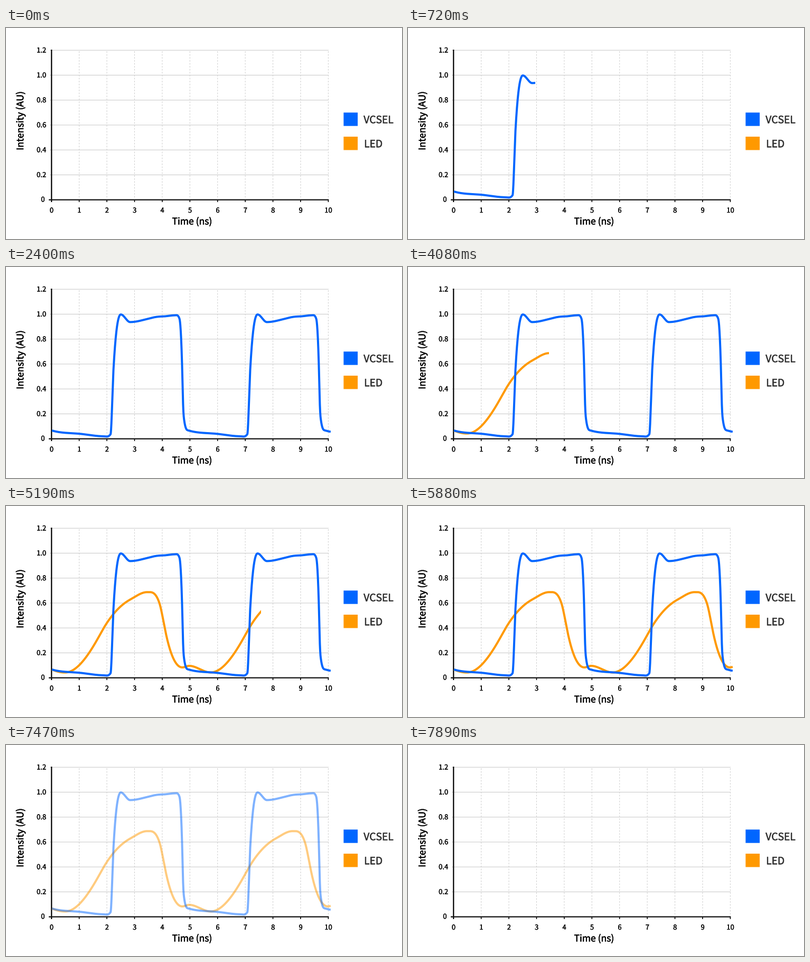
Animation of 750 by 400 pixels, one loop 8100 ms. Source, as a matplotlib script:

```python
import numpy as np
import matplotlib.pyplot as plt
from matplotlib.animation import FuncAnimation
from matplotlib.patches import Rectangle
from matplotlib.patheffects import withStroke

W, H, DPI = 750, 400, 100
FRAMES, STEP = 270, 30
PT = 72 / DPI
BLUE, ORANGE = "#0066ff", "#ff9900"
INK, GRID = "#111111", "#cccccc"
X0, Y0, DX, DY = 86.2, 325.7, 52.42, 47.25

fig = plt.figure(figsize=(W / DPI, H / DPI), dpi=DPI, facecolor="white")
ax = fig.add_axes([0, 0, 1, 1])
ax.set_xlim(0, W)
ax.set_ylim(H, 0)
ax.axis("off")


def line(xs, ys, color, width, **kw):
    return ax.plot(xs, ys, color=color, lw=width * PT, snap=False,
                   solid_capstyle="butt", dash_capstyle="butt", **kw)[0]


def label(x, y, text, size, color="black", weight=0.03, **kw):
    # a thin outline gives the regular face a semibold weight
    ax.text(x, y, text, fontsize=size * PT, color=color,
            family="Noto Sans CJK JP", va="baseline",
            path_effects=[withStroke(linewidth=size * weight * PT,
                                     foreground=color)], **kw)


def hermite(x, keys):
    """Cubic through (x, y, slope) keys."""
    kx, ky, km = np.array(keys, float).T
    i = np.clip(np.searchsorted(kx, x, side="right") - 1, 0, len(kx) - 2)
    h = kx[i + 1] - kx[i]
    s = (x - kx[i]) / h
    ease = s * s * (3 - 2 * s)
    return (ky[i] + ease * (ky[i + 1] - ky[i])
            + h * s * (1 - s) * ((1 - s) * km[i] - s * km[i + 1]))


def periodic(x, keys):
    """Repeat the keyed pulse; x before its first key is left alone."""
    start, end = keys[0][0], keys[-1][0]
    return hermite(start + (x - start) % (end - start), keys)


def build_chart():
    for k in range(1, 7):
        y = Y0 - k * DY
        line([83, 611], [y, y], GRID, 1.1)
        label(76.3, y + 4.3, f"{k * 0.2:.1f}", 13, weight=0.022, ha="right")
    label(73.5, Y0 + 3.7, "0", 13, weight=0.022, ha="right")

    for k in range(11):
        x = X0 + k * DX
        if k:
            line([x, x], [44, 324], GRID, 1, ls=(0, (3, 2.6)))
            line([x, x], [Y0, 330], INK, 1.8)
        label(x + 0.2, 350, str(k), 13, weight=0.022, ha="center")

    line([81, 611.3], [Y0, Y0], INK, 2.2)
    line([X0, X0], [41, 330], INK, 2.4)
    label(352.5, 372.5, "Time (ns)", 17.5, ha="center")
    label(33, 176, "Intensity (AU)", 17.7, ha="center", rotation=90,
          rotation_mode="anchor")

    for y, x, color, text in ((160.3, 677.3, BLUE, "VCSEL"),
                              (206, 678.2, ORANGE, "LED")):
        ax.add_patch(Rectangle((639.4, y), 26.7, 25.4, color=color, lw=0,
                               snap=False))
        label(x, y + 20.2, text, 19.2, "#333333")


build_chart()

# one period of each signal as (x, y, slope)
LASER = [(87, 310, 0.3), (140, 316.2, 0.1), (185, 320.9, 0), (198, 317, -1.5),
         (203.5, 195, -18), (217.5, 90, 0), (235, 104.4, 0), (295, 93.8, 0),
         (320, 91.6, 0), (328.5, 98, 3), (334.7, 235, 45), (337, 287, 8),
         (346, 310, 0.3)]
DIODE = [(112, 315.6, 0), (179, 242, -1.85), (235, 177.5, -0.55),
         (267, 163.3, 0), (290.5, 184, 3), (301, 233, 5), (334, 306, 0),
         (347, 303, 0), (387.5, 315.6, 0)]

xs = np.arange(87, 615, 0.1)
lead_in = hermite(xs, [(87, 310, 0.45), (112, 315.6, 0)])
slow = line(xs, np.where(xs < 112, lead_in, periodic(xs, DIODE)), ORANGE, 4,
            zorder=3)
fast = line(xs, periodic(xs, LASER), BLUE, 4, zorder=4)

# curve, start frame, step count, pixels per step
REVEALS = ((fast, 1, 79, 6.69), (slow, 105, 91, 5.823))
FADE_START, FADE_STEPS = 235, 28


def update(i):
    alpha = float(np.clip(1 - (i - FADE_START) / FADE_STEPS, 0, 1))
    for curve, start, steps, speed in REVEALS:
        n = min(i - start, steps)
        curve.set_visible(n > 0 and alpha > 0)
        curve.set_alpha(alpha)
        curve.set_clip_path(Rectangle((0, 0), 86.7 + max(n, 1) * speed, H,
                                      transform=ax.transData))
    return fast, slow


anim = FuncAnimation(fig, update, frames=FRAMES, interval=STEP, repeat=True,
                     repeat_delay=0, blit=False)
plt.show()
```
